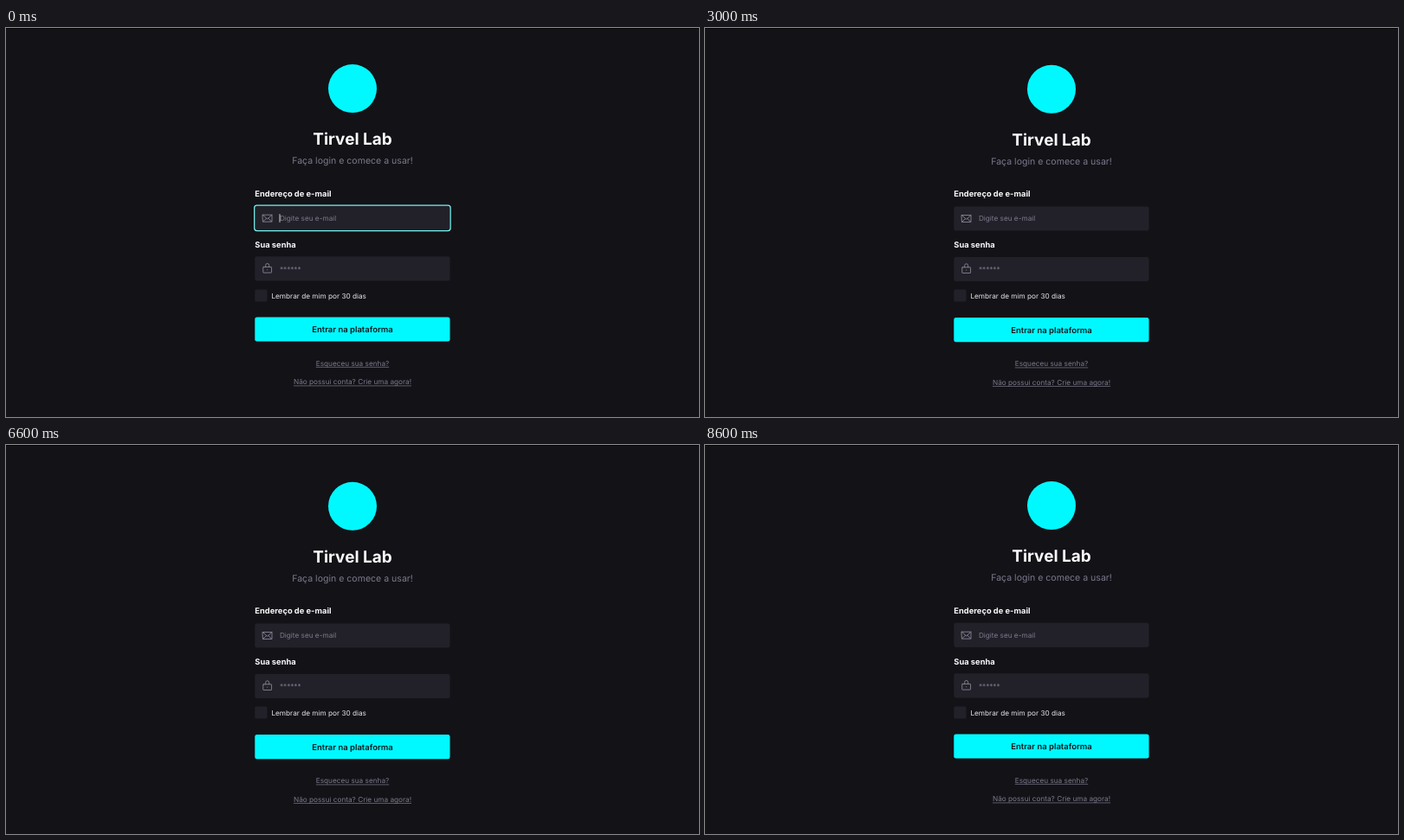
Write an HTML page with a canvas that moves like this. It is 800 px wide and 450 px high and loops after 8900 ms.

```html
<!DOCTYPE html>
<html lang="pt-BR">
<head>
<meta charset="utf-8">
<title>Login</title>
<style>
  html, body { margin: 0; width: 100%; height: 100%; overflow: hidden; background: #131217; }
  canvas { display: block; width: 800px; height: 450px; }
</style>
</head>
<body>
<canvas id="stage" width="800" height="450"></canvas>
<script>
const ctx = document.getElementById('stage').getContext('2d');
const LOOP = 8900;
const LEFT = 287.3, WIDTH = 225.2, FIELD_H = 28.2, RADIUS = 2.4;
const SMALL = 8.22, LABEL = 9.35, BUTTON = 9.48;
const C = {
  bg: '#131217', field: '#222129', accent: '#00f9ff', ring: '#78f4f4',
  text: '#fbfafc', soft: '#e6e4ea', muted: '#7c798c', icon: '#8a8796', ink: '#10161b'
};

// Times in ms at which the state of the page switches.
const BLUR = 2900, HOVER_FORGOT = 4300, HOVER_SIGNUP = 5500, LEAVE = 6300;
const RELOAD = 6700, LOADED = 6900;

const clamp = v => Math.min(1, Math.max(0, v));
const within = (t, a, b) => t >= a && t < b;

function text(str, x, y, size, weight, color, align = 'left') {
  ctx.font = `${weight} ${size}px Inter, sans-serif`;
  ctx.textAlign = align;
  ctx.fillStyle = color;
  ctx.fillText(str, x, y);
}

function box(x, y, w, h, color, r = RADIUS) {
  ctx.beginPath();
  ctx.roundRect(x, y, w, h, r);
  ctx.fillStyle = color;
  ctx.fill();
}

function link(str, y, hovered) {
  text(str, 400, y, SMALL, 400, hovered ? C.text : C.muted, 'center');
  const w = ctx.measureText(str).width;
  ctx.fillRect(400 - w / 2, y + 1.2, w, 0.7);
}

// Icons are drawn on a 256-unit grid.
function icon(path, x, y) {
  ctx.save();
  ctx.translate(x, y);
  ctx.scale(14.2 / 256, 14.2 / 256);
  ctx.strokeStyle = C.icon;
  ctx.lineWidth = 16;
  ctx.lineCap = ctx.lineJoin = 'round';
  ctx.stroke(path);
  ctx.restore();
}

const envelope = new Path2D('M32 56H224V192a8 8 0 0 1-8 8H40a8 8 0 0 1-8-8ZL128 144 224 56M110 128 34 198M146 128 222 198');
const lock = new Path2D('M48 88H208a8 8 0 0 1 8 8V200a8 8 0 0 1-8 8H48a8 8 0 0 1-8-8V96a8 8 0 0 1 8-8ZM92 88V52a36 36 0 0 1 72 0V88M126 148h4');

function field(y, path, hint, lift, focused) {
  const top = y - lift;
  box(LEFT, top, WIDTH, FIELD_H, C.field);
  if (focused) {
    ctx.beginPath();
    ctx.roundRect(LEFT - 0.6, top - 0.6, WIDTH + 1.2, FIELD_H + 1.2, RADIUS + 0.6);
    ctx.strokeStyle = C.ring;
    ctx.lineWidth = 1.25;
    ctx.stroke();
  }
  icon(path, 294.6, y + 7 - lift / 2);
  text(hint, 315.9, y + 17, SMALL, 400, C.muted);
}

function page(t) {
  const lift = 0.7 * (1 - clamp((t - 100) / 800) + clamp((t - 8300) / 300));
  const focused = t < BLUR;

  ctx.beginPath();
  ctx.arc(400, 70.8 - lift, 28, 0, Math.PI * 2);
  ctx.fillStyle = C.accent;
  ctx.fill();

  text('Tirvel Lab', 400, 135.8 - lift, 18.96, 700, C.text, 'center');
  text('Faça login e comece a usar!', 400, 157.6 - lift, 10.56, 400, C.muted, 'center');

  text('Endereço de e-mail', LEFT, 195.4 - lift, LABEL, 700, C.text);
  field(206.4, envelope, 'Digite seu e-mail', lift, focused);
  if (focused && t % 1000 < 500) {
    ctx.fillStyle = C.text;
    ctx.fillRect(315.6, 215.2, 0.8, 9.6);
  }

  text('Sua senha', LEFT, 254.4 - lift, LABEL, 700, C.text);
  field(264.9, lock, '******', lift, false);

  box(LEFT, 302.4, 14.2, 14.2, C.field, 1.5);
  text('Lembrar de mim por 30 dias', 306.4, 312.5, SMALL, 400, C.soft);

  box(LEFT, 335.1 - lift, WIDTH, FIELD_H, C.accent);
  text('Entrar na plataforma', 400, 352.7 - lift / 2, BUTTON, 600, C.ink, 'center');

  link('Esqueceu sua senha?', 391.4 - lift, within(t, HOVER_FORGOT, HOVER_SIGNUP));
  link('Não possui conta? Crie uma agora!', 413.1 - lift, within(t, HOVER_SIGNUP, LEAVE));
}

function draw(t) {
  const blank = within(t, RELOAD, LOADED);
  ctx.fillStyle = blank ? '#fefcff' : C.bg;
  ctx.fillRect(0, 0, 800, 450);
  ctx.fillStyle = blank ? '#6a696b' : '#030304';
  ctx.fillRect(0, 0, 800, 1);
  if (!blank) page(t);
}

ctx.textRendering = 'geometricPrecision';
const start = performance.now();
function tick() {
  draw((performance.now() - start) % LOOP);
  requestAnimationFrame(tick);
}
tick();
</script>
</body>
</html>
```
